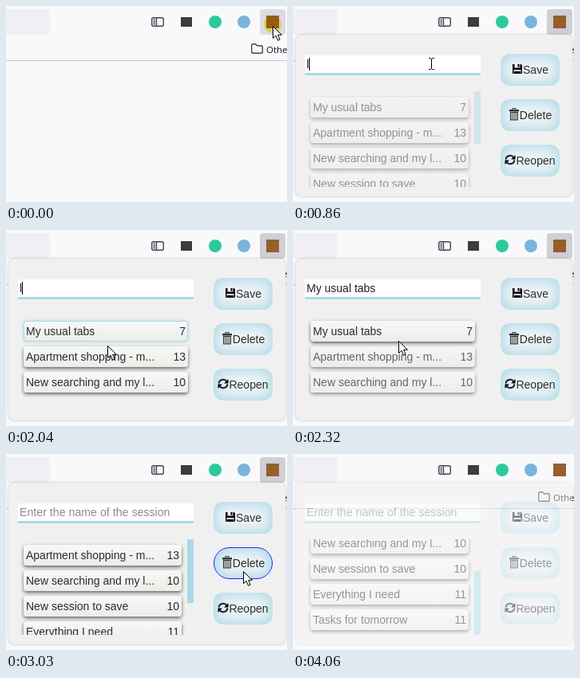
These frames come from a looping animation (352 by 246 pixels, 4100 ms). An HTML page:

```html
<!DOCTYPE html>
<html lang="en">
<head>
<meta charset="utf-8">
<title>Session popup</title>
<style>
  html, body { margin: 0; width: 100%; height: 100%; overflow: hidden; background: #f9f9fb; }
  div, svg, i { position: absolute; box-sizing: border-box; }
  #stage { width: 352px; height: 246px; overflow: hidden; font: 14px/25px "Liberation Sans", Arial, sans-serif; color: #2c2c2c; white-space: nowrap; }
  #url { left: -5px; top: 4px; width: 60px; height: 32px; border-radius: 4px; background: #f0f0f4; }
  #rule { top: 68px; width: 100%; height: 1px; background: #c8c8cc; }
  #mark { left: 326px; top: 42px; font: 11.5px/25px "Open Sans", sans-serif; color: #15141a; }
  #tool { left: 318px; top: 4px; width: 32px; height: 32px; border-radius: 4px; }
  #glow { left: 323px; top: 12px; width: 22px; height: 22px; border-radius: 50%; background: #fff04acc; mix-blend-mode: multiply; }
  #panel { left: 3px; top: 36px; width: 347px; height: 203px; border-radius: 8px; background: #f0f0f0; box-shadow: 0 0 3px #0004; }
  #field { left: 12px; top: 26px; width: 220px; height: 25px; padding-left: 2px; background: #fff; border-bottom: 3px solid lightblue; line-height: 23px; }
  #caret { left: 5px; top: 3px; width: 1px; height: 16px; background: #000; }
  #list { left: 12px; top: 71px; width: 220px; height: 120px; overflow: hidden; }
  #thumb { right: 0; width: 8px; background: lightblue; }
  .row { left: 7px; height: 26px; padding: 0 3px; border-radius: 4px; line-height: 27px; background: linear-gradient(#f8f8f8, #ecece8); box-shadow: 0 2px 4px #0009; }
  .row.hot { box-shadow: inset 0 0 0 1px lightblue, 0 0 4px lightblue; }
  .row i { right: 3px; font-style: normal; }
  .btn { left: 257px; width: 74px; height: 40px; border-radius: 12px; background: #eef3f5; box-shadow: inset 0 0 16px 3px lightblue; display: flex; align-items: center; justify-content: center; }
  .btn svg { position: relative; top: -1px; }
  .btn.hot { border: 1px solid #22f; border-radius: 20px; }
</style>
</head>
<body>
<div id="stage">
  <div id="url"></div>
  <div id="rule"></div>
  <div id="mark">Other Bookmarks</div>
  <div id="tool"></div>
  <svg width="352" height="70" fill="none" stroke="#44444c" stroke-width="1.4">
    <rect x="182.700" y="14.700" width="14.600" height="10.600" rx="2"/>
    <path d="M188.500 15v10M184.500 17.500h2.500M184.500 20h2.500M184.500 22.500h2.500"/>
    <path d="M307.700 58v-8.500q0-1.800 1.800-1.800h3l2 2h5q1.800 0 1.800 1.800v6q0 1.800-1.800 1.800h-10q-1.800 0-1.800-1.800z"/>
    <g stroke="none">
      <rect x="219" y="14" width="14" height="12" fill="#3c3c3c"/>
      <circle cx="262" cy="20" r="8" fill="#2fc89a"/>
      <circle cx="298" cy="20" r="8" fill="#79b4dc"/>
      <rect x="326" y="12" width="16" height="16" fill="#96602c"/>
    </g>
  </svg>
  <div id="panel">
    <div id="field"><span id="text"></span><div id="caret"></div></div>
    <div id="list"><div id="thumb"></div></div>
    <div class="btn" style="top:24px">
      <svg width="14" height="14"><path d="M1 1h2.500v4.500h7V1h1l1.500 1.500V13h-1.500V8h-9v5H1zM7.500 1h2v3.500h-2zM3 10h8v3H3z"/></svg>Save
    </div>
    <div class="btn" id="del" style="top:81px">
      <svg width="14" height="16"><path fill="#333" fill-rule="evenodd" d="M4.500 0h5v2H13v2.500H1V2h3.500zM5.500 1v1h3V1zM2 5h10v10.500H2zM3.300 6v8.500h1.200V6zM5.400 6v8.500h1.200V6zM7.500 6v8.500h1.200V6zM9.600 6v8.500h1.200V6z"/></svg>Delete
    </div>
    <div class="btn" style="top:138px">
      <svg width="14" height="14"><path d="M1.500 6.500A5.500 5.500 0 0 1 11 3.500M12.500 7.500A5.500 5.500 0 0 1 3 10.500" fill="none" stroke="#222" stroke-width="2"/><path d="M13.500 1v5.500H8zM.5 13V7.500H6z"/></svg>Reopen
    </div>
  </div>
  <div id="glow"></div>
  <svg id="cursor" width="1" height="1" overflow="visible">
    <path id="arrow" d="M.5.5v15l3.500-3.300 2.500 6 2.600-1.100-2.500-5.800h4.800z" fill="#fff" stroke="#000"/>
    <path id="beam" d="M-3-6.500h2.500l1 1 1-1H4M.5-6V7M-3 7.500h2.500l1-1 1 1H4" fill="none" stroke="#000"/>
  </svg>
</div>
<script>
const LOOP = 4100;
const $ = id => document.getElementById(id);
const names = [
  ['My usual tabs', 7], ['Apartment shopping - m...', 13], ['New searching and my l...', 10],
  ['New session to save', 10], ['Everything I need', 11], ['Tasks for tomorrow', 11]
];
const rows = names.map(([name, count]) => {
  const row = document.createElement('div');
  row.className = 'row';
  row.innerHTML = `${name}<i>${count}</i>`;
  $('list').append(row);
  return row;
});

// Pointer stops: time, x, y
const path = [
  [0, 334, 25], [70, 334, 25], [400, 173, 72], [1740, 173, 72], [2040, 127, 145],
  [2130, 127, 155], [2240, 127, 138], [2290, 127, 138], [2590, 288, 156],
  [2780, 297, 147], [3350, 297, 147], [3540, 127, 132], [3680, 127, 132], [3850, 150, 250], [LOOP, 150, 250]
];

const ramp = (t, a, b) => Math.min(1, Math.max(0, (t - a) / (b - a)));
const ease = (t, a, b) => { const p = ramp(t, a, b); return p * p * (3 - 2 * p); };
const within = (t, a, b) => t >= a && t < b;
const show = (el, on) => { el.style.visibility = on ? 'inherit' : 'hidden'; };

function drawPointer(t) {
  const i = path.findIndex(p => p[0] > t);
  const [a, b] = [path[i - 1], path[i]];
  const p = ease(t, a[0], b[0]);
  const [x, y] = [1, 2].map(k => Math.round(a[k] + (b[k] - a[k]) * p));
  $('cursor').style.transform = `translate(${x}px,${y}px)`;
  const beam = within(t, 330, 1780) || within(t, 3510, 3700);
  show($('beam'), beam);
  show($('arrow'), !beam);
  show($('glow'), t < 110);
}

function drawField(t) {
  const typed = within(t, 750, 2280) ? 'l' : within(t, 2280, 2820) ? names[0][0] : '';
  const text = $('text');
  text.textContent = typed || 'Enter the name of the session';
  text.style.color = typed ? '#222' : '#8c8c8c';
  text.style.fontSize = typed ? '14px' : '14.2px';
  show($('caret'), within(t, 750, 1000) || within(t, 1200, 1580) || within(t, 1740, 2280));
}

function drawList(t) {
  const filtered = within(t, 1000, 2820), deleted = t >= 2820;
  const scroll = deleted ? Math.round(47 * ease(t, 3485, 3645)) : 0;
  const fade = deleted ? ramp(t, 2790, 3030)
    : filtered ? ramp(t, 1160, 1340) : 1 - ramp(t, 710, 1000);
  rows.forEach((row, i) => {
    const s = row.style;
    show(row, deleted ? i > 0 : !filtered || i < 3);
    s.top = 7 + 32 * (i - deleted) - scroll + 'px';
    s.width = (filtered ? 206 : 198) + 'px';
    s.opacity = filtered && i ? fade * (1 - ramp(t, 2280, 2420)) : fade;
    row.classList.toggle('hot', i === 0 && within(t, 1900, 2300) || i === 1 && within(t, 3480, LOOP));
  });
  const thumb = $('thumb');
  show(thumb, !filtered);
  thumb.style.opacity = fade;
  thumb.style.height = (deleted ? 80 : 66) + 'px';
  thumb.style.top = Math.round(scroll * 40 / 47) + 'px';
}

function draw(t) {
  drawPointer(t);
  drawField(t);
  drawList(t);
  $('panel').style.opacity = ramp(t, 40, 220) * (1 - ramp(t, 3870, 4090) * .6);
  $('tool').style.background = t < 40 ? '#dcdce3' : t < 3890 ? '#cfcfd6' : 'none';
  $('del').classList.toggle('hot', within(t, 2480, 3430));
}

function tick(now) {
  draw(now % LOOP);
  requestAnimationFrame(tick);
}
draw(0);
requestAnimationFrame(tick);
</script>
</body>
</html>
```
